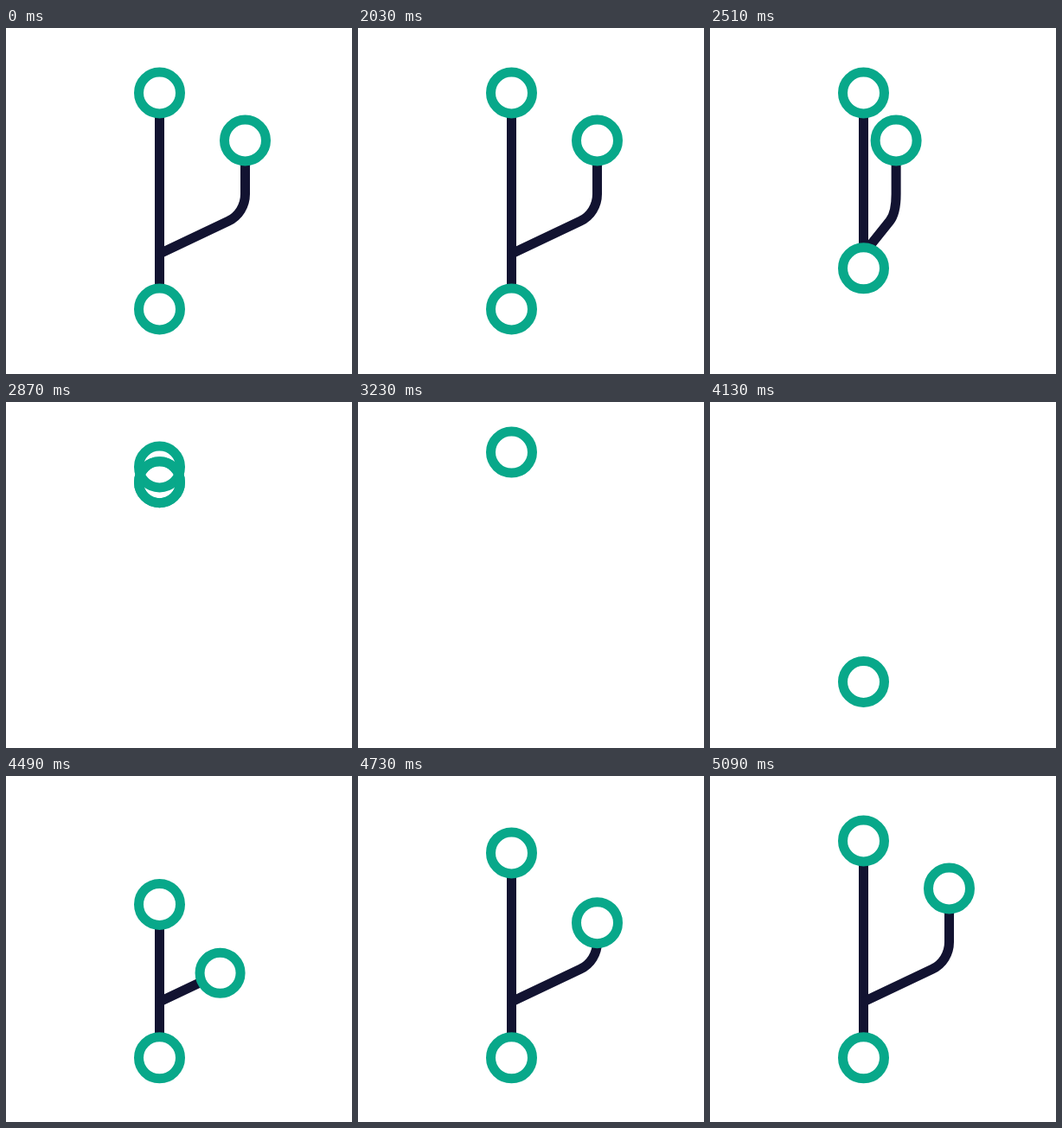
These frames come from a looping animation (400 px wide and 400 px high, 5.12 s). An HTML page:

```html
<!DOCTYPE html>
<html lang="en">
<head>
<meta charset="utf-8">
<title>Branch icon</title>
<style>
  html, body { margin: 0; width: 100%; height: 100%; overflow: hidden; background: #fff; }
  svg { display: block; width: 100%; height: 100%; }
  .line { fill: none; stroke: #121331; stroke-width: 11; }
  #branch { stroke-linecap: round; }
  .hole { fill: #fff; }
  .ring { fill: none; stroke: #08a88a; stroke-width: 11; }
</style>
</head>
<body>
<svg viewBox="0 0 400 400">
  <path id="stem" class="line"/>
  <path id="branch" class="line"/>
  <rect id="cover" width="400" height="400" fill="#fff"/>
  <g id="holes"></g>
  <g id="rings"></g>
</svg>
<script>
const LOOP = 5120, REST = 2030, STEP = 30;
const X = 177.5, TOP = 75, BOTTOM = 325, SIDE_X = 276.5, SIDE_Y = 130, R = 24;
const HIT = 2892, LAUNCH = 4205, SPROUT = 4310;

const $ = id => document.getElementById(id);
const stem = $('stem'), branch = $('branch'), cover = $('cover');

const part = (t, from, to) => Math.min(1, Math.max(0, (t - from) / (to - from)));
const mix = (a, b, p) => a + (b - a) * p;
const smooth = p => (1 - Math.cos(Math.PI * p)) / 2;
const easeOut = (p, n) => 1 - (1 - p) ** n;

function addCircle(parent, cls) {
  const c = document.createElementNS('http://www.w3.org/2000/svg', 'circle');
  c.setAttribute('class', cls);
  return $(parent).appendChild(c);
}

const nodes = [0, 1, 2].map(() => [addCircle('holes', 'hole'), addCircle('rings', 'ring')]);

function place(i, x, y, r) {
  for (const c of nodes[i]) {
    c.setAttribute('cx', x);
    c.setAttribute('cy', y);
    c.setAttribute('r', r);
    c.style.display = r > 0.05 ? '' : 'none';
  }
}

// Side branch squeezed horizontally so that it ends at x
function branchPath(x) {
  const at = px => mix(X, x, (px - X) / (SIDE_X - X));
  return `M${X} 261 L${at(257)} 223.3 C${at(269)} 217.6 ${x} 205.5 ${x} 192 V${SIDE_Y}`;
}

function drawLines(top, bottom, sideX, visible) {
  stem.style.display = branch.style.display = visible ? '' : 'none';
  stem.setAttribute('d', `M${X} ${top}V${bottom}`);
  branch.setAttribute('d', branchPath(sideX));
  branch.style.strokeDasharray = 'none';
  cover.setAttribute('y', bottom);
}

function collapse(t) {
  const bottom = mix(BOTTOM, TOP, part(t, REST, HIT) ** 2.85);
  const sideX = mix(SIDE_X, X, part(t, REST, 2622) ** 2.28);
  drawLines(TOP, bottom, sideX, true);
  place(0, X, TOP, R);
  place(1, X, bottom, R);
  place(2, sideX, Math.min(SIDE_Y, bottom), R);
}

function hop(t) {
  drawLines(TOP, BOTTOM, SIDE_X, false);
  place(0, X, mix(TOP, 56.3, easeOut(part(t, HIT, 3380), 2)), R * (1 - smooth(part(t, 3368, 3721))));
  place(1, X, mix(BOTTOM, 323.5, smooth(part(t, 3590, 3800))), R * smooth(part(t, 3435, 3796)));
  place(2, X, SIDE_Y, 0);
}

function grow(t) {
  const bottom = mix(323.5, 325.8, smooth(part(t, LAUNCH, 4420)));
  const top = mix(BOTTOM, TOP, easeOut(part(t, LAUNCH, 5055), 3));
  drawLines(top, bottom, SIDE_X, true);
  const total = branch.getTotalLength();
  const reach = total * easeOut(part(t, SPROUT, 5085), 2);
  const tip = branch.getPointAtLength(reach);
  branch.style.strokeDasharray = `${reach} ${total + 20}`;
  if (!reach) branch.style.display = 'none';
  place(0, X, top, R);
  place(1, X, bottom, R);
  place(2, tip.x, tip.y, R * smooth(part(t, SPROUT - 20, 4510)));
}

function frame(now) {
  const time = now % LOOP;
  const t = time < REST ? 0 : REST + Math.floor((time - REST) / STEP) * STEP;
  (t < HIT ? collapse : t < LAUNCH ? hop : grow)(t);
  requestAnimationFrame(frame);
}

frame(0);
</script>
</body>
</html>
```
